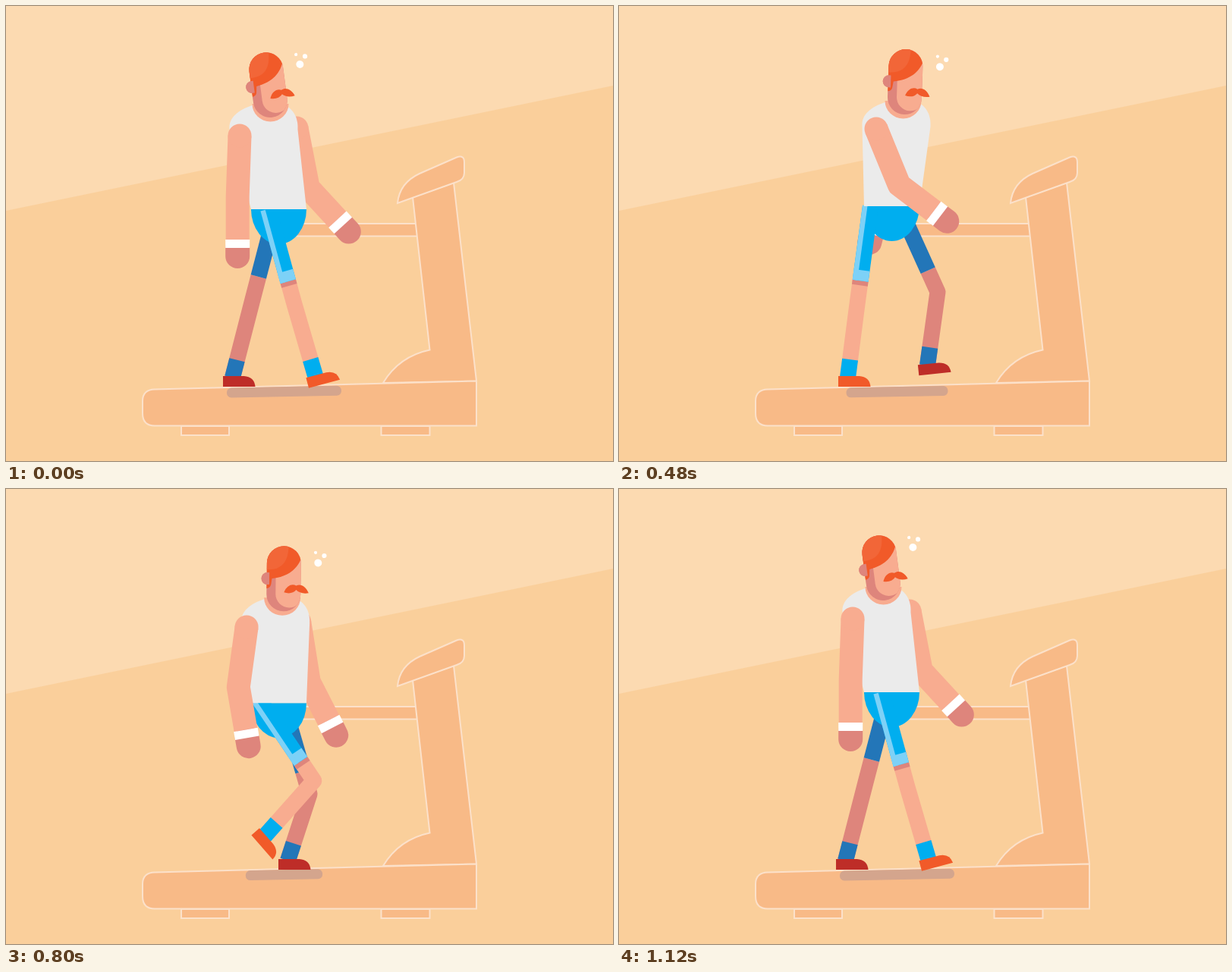
An HTML page with a canvas for the animation above (1.16 s loop, 800x600 px).

```html
<!DOCTYPE html>
<html lang="en">
<head>
<meta charset="utf-8">
<title>Treadmill walk</title>
<style>
html, body { margin: 0; width: 100%; height: 100%; overflow: hidden; }
canvas { display: block; }
</style>
</head>
<body>
<canvas id="stage" width="800" height="600"></canvas>
<script>
const ctx = document.getElementById('stage').getContext('2d');
const STEP = 40, LOOP = 1160, CYCLE = 28, TURN = Math.PI / 180;

const SKIN = '#f8ac90', SHADE = '#de857c', ORANGE = '#f15a29', RED = '#be2d28';
const BLUE = '#00aeef', PALE = '#7dd1f7', NAVY = '#2376b8';
const MACHINE = '#f8ba87', EDGE = '#fce1ca';

// Smooth periodic curve through keys; stays flat where neighbouring keys are equal.
function curve(times, values, period = CYCLE) {
  const n = times.length;
  const at = i => times[(i + n) % n] + period * Math.floor(i / n);
  const val = i => values[(i + n) % n];
  const slope = i => (val(i + 1) - val(i)) / (at(i + 1) - at(i));
  const tangent = i => {
    const a = slope(i - 1), b = slope(i);
    const before = at(i) - at(i - 1), after = at(i + 1) - at(i);
    return a * b === 0 ? 0 : (a * after + b * before) / (before + after);
  };
  return time => {
    const t = ((time % period) + period) % period;
    let i = n - 1;
    while (times[i] > t) i--;
    const span = at(i + 1) - at(i), s = (t - at(i)) / span, r = 1 - s;
    return val(i) * r * r * (1 + 2 * s) + val(i + 1) * s * s * (3 - 2 * s) +
      span * s * r * (tangent(i) * r - tangent(i + 1) * s);
  };
}

const body = (...v) => curve([0, 4, 8, 12, 17, 23], v);
const bounce = (...v) => curve([0, 3, 4, 8, 9, 12], v, 14);
const gait = (...v) => curve([0, 3, 4, 8, 9, 12, 14, 17, 18, 22, 23, 26], v);

const waistY = bounce(268, 280, 283, 276, 272, 264);
const shadowWidth = bounce(151, 126, 117, 100, 109, 134);
const neckX = body(348.5, 357, 371, 374.5, 371, 356.5);
const headTilt = body(-7.5, 0, 7.5, 2, 0.5, 0);

const nearArm = {
  x: body(308, 322, 337.5, 339, 327.5, 308.5),
  rise: body(97, 99, 102, 102, 102, 98),
  upper: body(-2, 13.5, 23.4, 22.3, 3.2, -13.7),
  fore: body(0, 22.4, 45, 52.8, 28.8, -4.6)
};
const farArm = {
  x: body(383, 372, 366, 366, 378, 392),
  rise: () => 107,
  upper: body(11, 0, -8, -12, 2, 13.4),
  fore: body(42.7, 18, -12, -14, 6, 44.5)
};

const kneeX = bend => gait(380, 401, 400, 361 + bend, 351 + bend * 0.8, 314, 309, 379.5, 390, 414, 415, 404);
const kneeY = gait(393, 393, 398, 400, 397, 393, 387, 402, 396, 379, 379, 377);
const ankleX = gait(408, 382.5, 373.5, 337.5, 328.5, 301.5, 282.5, 314, 323, 358, 366.5, 390.5);
const ankleY = gait(489, 490, 490, 490, 490, 490, 490, 469, 464, 458, 460.5, 474);
const footTilt = gait(-15, 0, 0, 0, 0, 0, 0, 35, 42, 47, 43, -6);

const nearLeg = {
  shift: 0, phase: 0, drop: 14, knee: kneeX(10),
  hip: body(349.5, 351, 343.4, 329.6, 340, 350.8),
  skin: SKIN, shorts: BLUE, sock: BLUE, shoe: ORANGE
};
const farLeg = {
  shift: 16, phase: 14, drop: 8.5, knee: kneeX(0),
  hip: body(353.8, 359, 368, 372.7, 373.4, 361),
  skin: SHADE, shorts: NAVY, sock: NAVY, shoe: RED
};

function fill(path, color) {
  ctx.fillStyle = color;
  ctx.fill(new Path2D(path));
}

function part(path) {
  fill(path, MACHINE);
  ctx.strokeStyle = EDGE;
  ctx.lineWidth = 2;
  ctx.lineJoin = 'miter';
  ctx.stroke(new Path2D(path));
}

function line(color, width, points, cap = 'butt') {
  ctx.strokeStyle = color;
  ctx.lineWidth = width;
  ctx.lineCap = cap;
  ctx.lineJoin = 'round';
  ctx.beginPath();
  for (const [x, y] of points) ctx.lineTo(x, y);
  ctx.stroke();
}

function dot(x, y, r, color) {
  ctx.fillStyle = color;
  ctx.beginPath();
  ctx.arc(x, y, r, 0, 7);
  ctx.fill();
}

function placed(x, y, degrees, draw) {
  ctx.save();
  ctx.translate(x, y);
  ctx.rotate(degrees * TURN);
  draw();
  ctx.restore();
}

const move = ([x, y], [dx, dy], k) => [x + dx * k, y + dy * k];
const hanging = degrees => [Math.sin(degrees * TURN), Math.cos(degrees * TURN)];
const toward = (a, b) => {
  const d = Math.hypot(b[0] - a[0], b[1] - a[1]);
  return [(b[0] - a[0]) / d, (b[1] - a[1]) / d];
};

function drawRoom() {
  fill('M0 0H800V600H0Z', '#facf9b');
  fill('M0 0H800V105L0 270Z', '#fcdab1');
}

function drawTreadmill() {
  part('M370 287H545V303.5H370Z');
  part('M536 252L590 233L620 494.5L497 497Q518 462 558.5 453.5Z');
  part('M516 260C518 240 530 228 545 221L594 199.5Q604 196 604 206V220Q604 229 594 232Z');
  part('M231 554H294V566H231Z');
  part('M494.5 554H558.5V566H494.5Z');
  part('M196 505.5L620 494.5V553.5H196Q180 553.5 180 537V521Q180 506 196 505.5Z');
}

function drawShadow(p) {
  const w = shadowWidth(p);
  placed(366.5, 508.7, -1.1, () => {
    ctx.fillStyle = '#d4a58d';
    ctx.beginPath();
    ctx.roundRect(-w / 2, -6.5, w, 13, 6);
    ctx.fill();
  });
}

function drawArm(arm, p, waist) {
  const shoulder = [arm.x(p), waist - arm.rise(p)];
  const elbow = move(shoulder, hanging(arm.upper(p)), 80);
  const down = hanging(arm.fore(p));
  const hand = move(elbow, down, 79);
  const cuff = move(hand, down, -22), palm = move(hand, down, -11);
  line(SHADE, 32, [palm, hand], 'round');
  line(SKIN, 31, [shoulder, elbow, cuff]);
  dot(...shoulder, 15.5, SKIN);
  line('#fff', 32, [cuff, palm]);
}

function drawLeg(leg, p, waist) {
  const q = p + leg.phase;
  const hip = [leg.hip(p), waist + leg.drop];
  const knee = [leg.knee(q) + leg.shift, kneeY(q)];
  const ankle = [ankleX(q) + leg.shift, ankleY(q)];
  const thigh = toward(hip, knee), shin = toward(knee, ankle);
  const hem = move(knee, thigh, -31), top = move(hem, thigh, -99);

  line(leg.skin, 21, [hem, knee, ankle]);
  line(leg.sock, 21, [move(ankle, shin, -24), ankle]);
  placed(...ankle, footTilt(q), () =>
    fill('M-12.5 -2H15Q29 -1 30 12H-12.5Z', leg.shoe));

  if (leg === farLeg) {
    line(leg.shorts, 21, [hip, hem]);
    return;
  }
  const side = [-thigh[1], thigh[0]];
  line(SHADE, 21, [hem, move(hem, thigh, 6)]);
  line(leg.shorts, 21, [top, hem]);
  line(PALE, 21, [move(hem, thigh, -14), hem]);
  line(PALE, 6.5, [move(top, side, 7.25), move(hem, side, 7.25)]);
}

function drawShirt(x, y, waist) {
  fill(`M${x - 24} ${y - 7}C${x - 42} ${y - 1} ${x - 55} ${y + 9} ${x - 54} ${y + 24}
    L323 ${waist}H396L${x + 36} ${y + 25}Q${x + 37} ${y + 5} ${x + 23} ${y - 5}Z`, '#ebebeb');
  fill(`M${x - 24} ${y - 9}A24 23.5 0 0 0 ${x + 24} ${y - 9}Z`, SKIN);
}

function drawHead() {
  ctx.translate(1.5, -34);
  fill('M-21.5 -8a8 8 0 0 0 0 16Z', SHADE);
  ctx.save();
  ctx.beginPath();
  ctx.roundRect(-22.5, -43, 45, 86, 22.5);
  ctx.clip();
  fill('M-23 -44H23V44H-23Z', SHADE);
  fill('M-10.5 -44H25.5V20A18 18 0 0 1 -10.5 20Z', SKIN);
  fill('M-23 -44H23V-28C18 -14 7 -3 -15.5 0L-16.5 7Q-17 12 -22 13H-23Z', ORANGE);
  fill('M-23 -12C-5 -11 6 -20 6 -44H-23Z', '#f26638');
  ctx.restore();
  fill('M-21.5 -8a8 8 0 0 0 0 16h2.5V-8Z', SHADE);
  fill('M.5 18C4 9 11 6 16.5 9C22 6 29 9 33 18.5C26 20 20 18 16.5 14.5C13 19 7 20 .5 18Z', ORANGE);
  dot(45, -21.5, 5, '#fff');
  dot(53, -31, 3.1, '#fff');
  dot(41.5, -35, 2.1, '#fff');
}

function drawWalker(p) {
  const waist = waistY(p), x = neckX(p), y = waist - 130;
  drawArm(farArm, p, waist);
  drawLeg(farLeg, p, waist);
  fill(`M323 ${waist}A36.5 46 0 0 0 396 ${waist}Z`, BLUE);
  drawLeg(nearLeg, p, waist);
  drawShirt(x, y, waist);
  placed(x, y, headTilt(p), drawHead);
  drawArm(nearArm, p, waist);
}

function frame(now) {
  const p = Math.floor((now % LOOP) / STEP) % CYCLE;
  drawRoom();
  drawTreadmill();
  drawShadow(p);
  drawWalker(p);
  requestAnimationFrame(frame);
}
requestAnimationFrame(frame);
</script>
</body>
</html>
```
